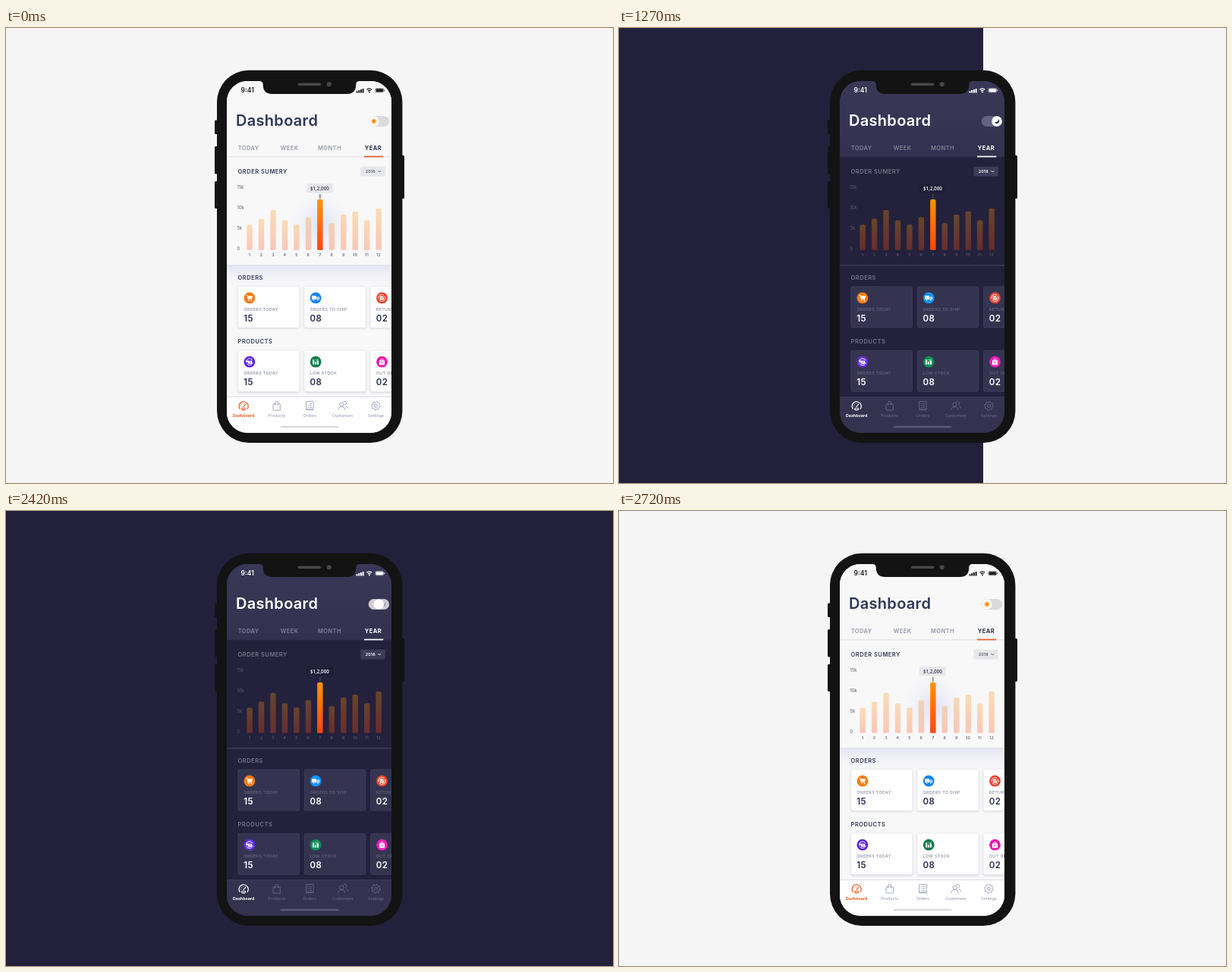
An HTML page with a canvas for the animation above (2790 ms loop, 800 by 600 pixels).

```html
<!DOCTYPE html>
<html lang="en">
<head>
<meta charset="utf-8">
<title>Dashboard theme switch</title>
<style>
html, body { margin: 0; width: 100%; height: 100%; overflow: hidden; background: #f5f5f5; }
canvas { display: block; width: 800px; height: 600px; }
</style>
</head>
<body>
<canvas id="stage" width="800" height="600"></canvas>
<script>
const ctx = document.getElementById('stage').getContext('2d');
const LOOP = 2790, STEP = 30;
const TAU = Math.PI * 2;

const light = {
  page: '#f5f5f5', head: ['#f8f8f9', '#f8f8f9'], body: '#f8f8f9', status: '#1c1c1e',
  title: '#2d3757', tab: '#9298a8', tabOn: '#2a3350', under: '#ec5a24', rule: '#dcdde0',
  section: '#2f3855', pick: '#e6e7ea', pickText: '#555c73', axis: '#565c70',
  tip: '#e8e8ec', tipText: '#333a50', pin: '#4a4a4a', barAlpha: 0.28,
  split: '#dfe1ea', card: '#ffffff', edge: '#ececf0', label: '#858ca0', number: '#263052',
  nav: '#ffffff', navRule: '#dfe0e5', navOn: '#ee5a1c', navOff: '#98a1b8', home: '#d9dade',
  icons: ['#f97a0b', '#1485f1', '#f03a25', '#5a22e4', '#087c48', '#ec18ae']
};
const dark = {
  page: '#22203b', head: ['#3a3857', '#33314f'], body: '#23213c', status: '#ffffff',
  title: '#ffffff', tab: '#828096', tabOn: '#ffffff', under: '#ffffff', rule: '#302e4a',
  section: '#777589', pick: '#3e3c58', pickText: '#ffffff', axis: '#5e5c73',
  tip: '#201e37', tipText: '#ffffff', pin: '#55536a', barAlpha: 0.31,
  split: '#3e3c57', card: '#353450', edge: '#424160', label: '#69677e', number: '#ffffff',
  nav: '#34324f', navRule: '#3b3957', navOn: '#ffffff', navOff: '#69677f', home: '#5c5a72',
  icons: ['#fb7d0c', '#1592f6', '#f4432c', '#6430ec', '#0a8f55', '#f31cb8']
};

function text(s, x, y, size, weight, color, spacing = 0, align = 'left', family = 'Inter') {
  ctx.font = `${weight} ${size}px ${family}, sans-serif`;
  ctx.letterSpacing = spacing + 'px';
  ctx.textAlign = align;
  ctx.fillStyle = color;
  ctx.fillText(s, x, y);
}

function box(x, y, w, h, r, color) {
  ctx.beginPath();
  ctx.roundRect(x, y, w, h, r);
  ctx.fillStyle = color;
  ctx.fill();
}

function disc(x, y, r, color) {
  ctx.beginPath();
  ctx.arc(x, y, r, 0, TAU);
  ctx.fillStyle = color;
  ctx.fill();
}

function line(points, color, width = 1) {
  ctx.beginPath();
  points.forEach(([x, y], i) => i ? ctx.lineTo(x, y) : ctx.moveTo(x, y));
  ctx.strokeStyle = color;
  ctx.lineWidth = width;
  ctx.stroke();
}

function arc(x, y, r, from, to, color, width = 1) {
  ctx.beginPath();
  ctx.arc(x, y, r, from, to);
  ctx.strokeStyle = color;
  ctx.lineWidth = width;
  ctx.stroke();
}

function outline(x, y, w, h, r, color, width = 0.9) {
  ctx.beginPath();
  ctx.roundRect(x, y, w, h, r);
  ctx.strokeStyle = color;
  ctx.lineWidth = width;
  ctx.stroke();
}

function at(x, y, draw) {
  ctx.save();
  ctx.translate(x, y);
  draw();
  ctx.restore();
}

function ramp(y0, y1, top, bottom) {
  const g = ctx.createLinearGradient(0, y0, 0, y1);
  g.addColorStop(0, top);
  g.addColorStop(1, bottom);
  return g;
}

// White glyphs inside the coloured card badges; c is the badge colour.
const badges = [
  () => {
    line([[-4.5, -3.5], [-3, -3.5], [-1.8, 1.8], [3.2, 1.8]], '#fff', 0.9);
    ctx.beginPath();
    ctx.moveTo(-2.9, -2.7); ctx.lineTo(4.3, -2.7); ctx.lineTo(3.3, 0.9); ctx.lineTo(-2, 0.9);
    ctx.fillStyle = '#fff';
    ctx.fill();
    disc(-1.2, 3.4, 0.9, '#fff');
    disc(2.6, 3.4, 0.9, '#fff');
  },
  c => {
    box(-5, -3, 5.8, 5.2, 0.6, '#fff');
    box(1.3, -1.4, 3.7, 3.6, 0.8, '#fff');
    box(2.5, -0.6, 1.6, 1.1, 0, c);
    for (const x of [-2.6, 2.6]) { disc(x, 2.5, 1.5, c); disc(x, 2.5, 1, '#fff'); }
  },
  c => {
    arc(0, 0, 4.6, -0.5, 2.5, '#fff', 1);
    arc(0, 0, 4.6, 2.9, 5.3, '#fff', 1);
    box(-2.7, -2.4, 5.4, 5, 0.8, '#fff');
    line([[-1.6, -0.8], [0, 0.9], [3.6, -3.2]], c, 0.9);
  },
  c => {
    arc(0, 0, 4.4, 3.3, 5.8, '#fff', 1);
    arc(0, 0, 4.4, 0.2, 2.6, '#fff', 1);
    box(-4.6, -1.8, 3.5, 2.5, 0.5, '#fff');
    box(-1.9, -1.4, 5.2, 4, 0.6, '#fff');
    box(0.1, -0.4, 1.3, 1.3, 0, c);
  },
  () => {
    box(-4, -3, 2, 6.5, 0, '#fff');
    box(-1.2, -0.3, 2, 3.8, 0, '#fff');
    box(1.7, -1.6, 2.1, 5.1, 0, '#fff');
    line([[-0.8, -3.2], [1, -1.8], [3.6, -3.8]], '#fff', 0.8);
  },
  c => {
    box(-3.6, -1.9, 7.2, 5.9, 0.6, '#fff');
    arc(0, -2, 1.8, Math.PI, TAU, '#fff', 0.9);
    line([[-1.2, -0.1], [1.2, 2.3]], c, 0.8);
    line([[1.2, -0.1], [-1.2, 2.3]], c, 0.8);
  }
];

const navIcons = [
  c => {
    arc(0, 0.5, 6, 2.45, 6.98, c, 1.2);
    line([[-0.4, 1.4], [2.8, -2]], c, 1.2);
    outline(-2.3, 3, 4.6, 2.4, 0.5, c, 1.1);
    for (let i = 0; i < 4; i++) {
      const a = Math.PI * (1.02 + i * 0.23);
      disc(Math.cos(a) * 3.8, 0.6 + Math.sin(a) * 3.8, 0.55, c);
    }
  },
  c => {
    outline(-4.7, -2.4, 9.4, 8.2, 0.6, c);
    line([[-2.2, -0.6], [-2.2, -3.6]], c, 0.9);
    line([[2.2, -0.6], [2.2, -3.6]], c, 0.9);
    arc(0, -3.6, 2.2, Math.PI, TAU, c, 0.9);
  },
  c => {
    outline(-4.8, -5.8, 9.6, 11.2, 0.5, c);
    for (const y of [-3, -0.4, 2.2]) {
      line([[-2.8, y], [-1.5, y]], c, 0.9);
      line([[-0.5, y], [2.8, y]], c, 0.9);
    }
    line([[-4.8, 4.2], [4.8, 4.2]], c, 0.7);
  },
  c => {
    arc(-1.5, -1.8, 2.6, 0, TAU, c, 0.9);
    arc(-1.5, 6, 4.9, Math.PI + 0.1, TAU - 0.1, c, 0.9);
    arc(2.5, -3.6, 2.4, -2.7, 1.6, c, 0.9);
    arc(2, 4.1, 4.6, -1.1, -0.1, c, 0.9);
  },
  c => {
    ctx.beginPath();
    for (let i = 0; i < 32; i++) {
      const a = (i + 0.5) / 32 * TAU, r = i % 4 < 2 ? 5.9 : 4.5;
      ctx.lineTo(Math.cos(a) * r, Math.sin(a) * r);
    }
    ctx.closePath();
    ctx.strokeStyle = c;
    ctx.lineWidth = 0.9;
    ctx.stroke();
    arc(0, 0, 2, 0, TAU, c, 0.9);
  }
];

function drawStatus(c) {
  text('9:41', 309.6, 85.2, 8.5, 600, c);
  for (let i = 0; i < 4; i++) box(461.5 + i * 2.7, 83.2 - i * 1.1, 2, 2.3 + i * 1.1, 0.5, c);
  for (const r of [2.6, 5]) arc(478.8, 85, r, -2.32, -0.82, c, 1.3);
  disc(478.8, 84.6, 0.9, c);
  outline(486.9, 79.6, 10.7, 5.2, 1.4, c, 0.5);
  box(487.6, 80.2, 9.3, 4, 0.8, c);
  box(498.2, 81.2, 0.9, 2, 0.4, c);
}

function drawHeader(p) {
  ctx.fillStyle = ramp(70, 170, ...p.head);
  ctx.fillRect(291, 70, 217, 100);
  ctx.fillStyle = p.rule;
  ctx.fillRect(291, 169.4, 217, 1);
  drawStatus(p.status);
  text('Dashboard', 303, 128.8, 20, 600, p.title, 0.3);
  [['TODAY', 305.7], ['WEEK', 361.8], ['MONTH', 411], ['YEAR', 472.8]].forEach(([s, x], i) =>
    text(s, x, 161.3, 7.5, i === 3 ? 700 : 600, i === 3 ? p.tabOn : p.tab, 0.4));
  ctx.fillStyle = p.under;
  ctx.fillRect(472, 168.7, 25.3, 1.7);
}

function drawChart(p) {
  text('ORDER SUMERY', 305.6, 191.6, 7.5, 600, p.section, 0.5);
  box(467.3, 182.8, 32.4, 12.6, 1.5, p.pick);
  text('2018', 473.8, 191, 5.3, 600, p.pickText, 0.1);
  line([[490.3, 188], [492.3, 190], [494.3, 188]], p.pickText, 0.9);

  if (p === light) {
    const glow = ctx.createRadialGradient(414, 258, 4, 414, 258, 40);
    glow.addColorStop(0, 'rgba(205,205,240,.5)');
    glow.addColorStop(1, 'rgba(225,225,245,0)');
    ctx.fillStyle = glow;
    ctx.fillRect(372, 216, 84, 84);
  }
  ['15k', '10k', '5k', '0'].forEach((s, i) => text(s, 304.6, 212 + i * 26.9, 5.6, 400, p.axis));

  const tops = [259.5, 251.5, 240, 253.5, 259.3, 249.5, 226, 257.3, 246, 242, 253.5, 238];
  tops.forEach((y, i) => {
    const x = 321.1 + i * 15.46;
    ctx.globalAlpha = i === 6 ? 1 : p.barAlpha;
    box(x - 3.7, y, 7.4, 292.7 - y, [2, 2, 0.8, 0.8], ramp(y, 292.7, '#ff9408', '#ff4610'));
    ctx.globalAlpha = 1;
    text(String(i + 1), x - 0.2, 301, 5.3, i === 6 ? 600 : 500, p.axis, 0, 'center');
  });
  box(396, 205.2, 35, 12.4, 1.8, p.tip);
  text('$1,2,000', 413.4, 213.6, 6.3, 600, p.tipText, 0, 'center', '"Open Sans"');
  line([[413.9, 218.8], [413.9, 225.4]], p.pin, 1);
}

function drawCards(p) {
  if (p === light) {
    ctx.fillStyle = ramp(313, 342, 'rgba(222,222,242,.75)', 'rgba(240,240,250,0)');
    ctx.fillRect(291, 313, 217, 29);
  }
  ctx.fillStyle = p.split;
  ctx.fillRect(291, 312.2, 217, 1.5);

  const rows = [
    ['ORDERS', [['ORDERS TODAY', '15'], ['ORDERS TO SHIP', '08'], ['RETURNS', '02']]],
    ['PRODUCTS', [['ORDERS TODAY', '15'], ['LOW STOCK', '08'], ['OUT OF STOCK', '02']]]
  ];
  rows.forEach(([name, cards], r) => at(0, r * 84.3, () => {
    text(name, 305.6, 332, 7.5, 600, p.section, 0.5);
    cards.forEach(([label, count], i) => at(i * 87.3, 0, () => {
      ctx.save();
      if (p === light) {
        ctx.shadowColor = 'rgba(40,40,70,.24)';
        ctx.shadowBlur = 3;
        ctx.shadowOffsetY = 0.8;
      }
      box(305.6, 340.8, 81.3, 54.5, 2, p.card);
      ctx.restore();
      outline(305.9, 341.1, 80.7, 53.9, 2, p.edge, 0.6);
      const k = r * 3 + i;
      disc(320.9, 355.9, 7.4, p.icons[k]);
      at(320.9, 355.9, () => badges[k](p.icons[k]));
      text(label, 313.2, 372.7, 5.4, 500, p.label, 0.35);
      text(count, 313.2, 387, 11.5, 600, p.number, 0.4);
    }));
  }));
}

function drawNav(p) {
  ctx.save();
  if (p === light) {
    ctx.shadowColor = 'rgba(40,40,70,.2)';
    ctx.shadowBlur = 3;
  }
  ctx.fillStyle = p.nav;
  ctx.fillRect(291, 486.5, 217, 48);
  ctx.restore();
  ctx.fillStyle = p.navRule;
  ctx.fillRect(291, 486, 217, 1);
  ['Dashboard', 'Products', 'Orders', 'Customers', 'Settings'].forEach((s, i) => {
    const x = 313.1 + i * 43.6, c = i ? p.navOff : p.navOn;
    at(x, 498.2, () => navIcons[i](c));
    text(s, x, 513.4, 5.3, i ? 500 : 700, c, 0, 'center');
  });
  box(361.5, 524.7, 77, 2.5, 1.25, p.home);
}

function drawSun(x) {
  disc(x, 123, 4.2, '#fdebcf');
  for (let i = 0; i < 8; i++) {
    const a = i / 8 * TAU;
    line([[x + Math.cos(a) * 2.6, 123 + Math.sin(a) * 2.6],
          [x + Math.cos(a) * 4, 123 + Math.sin(a) * 4]], '#fbb65c', 0.8);
  }
  disc(x, 123, 2.4, '#f98a12');
}

function drawMoon(x) {
  ctx.beginPath();
  ctx.arc(x - 0.2, 122.8, 3.3, -0.85, 2.6);
  ctx.quadraticCurveTo(x + 2.2, 124.2, x + 2, 120.3);
  ctx.fillStyle = '#38365a';
  ctx.fill();
}

// State: 0 day, 1 night, 0.5 a blend of both knobs.
function drawToggle(state, pill) {
  box(477.6, 115.9, 27.6, 14.2, 7.1, pill);
  if (state === 0) {
    disc(484.9, 123, 6.7, '#fbfbfb');
    drawSun(484.9);
  } else if (state === 1) {
    disc(498, 123, 6.8, '#ffffff');
    drawMoon(498);
  } else {
    ctx.globalAlpha = 0.3;
    disc(485, 123, 6.7, '#fff');
    disc(498, 123, 6.7, '#fff');
    drawSun(485.5);
    drawMoon(497.5);
    ctx.globalAlpha = 1;
    disc(491.3, 123, 6.8, '#fdfdfd');
  }
}

function drawPhone(p, state, pill) {
  const shell = '#131313';
  box(275, 121.5, 6, 18.5, 1.5, shell);
  box(275, 156, 6, 36.5, 1.5, shell);
  box(275, 202, 6, 36, 1.5, shell);
  box(519, 168, 6, 57, 1.5, shell);
  box(278, 55.8, 244.4, 491.2, 42, shell);

  ctx.save();
  ctx.beginPath();
  ctx.roundRect(291, 70, 217, 463.7, 27);
  ctx.clip();
  ctx.fillStyle = p.body;
  ctx.fillRect(291, 70, 217, 464);
  drawHeader(p);
  drawChart(p);
  drawCards(p);
  drawNav(p);
  drawToggle(state, pill);
  ctx.restore();

  ctx.beginPath();
  ctx.moveTo(334, 69);
  ctx.lineTo(334, 70);
  ctx.quadraticCurveTo(338.7, 70, 338.7, 74.5);
  ctx.quadraticCurveTo(338.7, 87, 351, 87);
  ctx.lineTo(449, 87);
  ctx.quadraticCurveTo(461.3, 87, 461.3, 74.5);
  ctx.quadraticCurveTo(461.3, 70, 466, 70);
  ctx.lineTo(466, 69);
  ctx.fillStyle = shell;
  ctx.fill();
  box(384.7, 72.4, 30.6, 3.6, 1.8, '#484848');
  disc(425.7, 74.2, 3, '#484848');
}

function draw(t) {
  const steps = from => Math.floor((t - from) / STEP);
  const clamp = v => Math.max(0, Math.min(1, v));

  const edge = t < 2420 ? 800 * clamp(steps(1090) / 10) : 800 * (1 - clamp(steps(2420) / 9));
  const palette = t >= 1090 && t < 2720 ? dark : light;

  let state = t >= 1060 && t < 2420 ? 1 : 0;
  let pill = state ? '#65637f' : t >= 2450 && t < 2720 ? '#e0e0e2' : '#dadadb';
  if (t >= 1030 && t < 1060) { state = 0.5; pill = '#8e8da1'; }
  if (t >= 2420 && t < 2450) { state = 0.5; pill = '#b5b4bf'; }

  ctx.fillStyle = light.page;
  ctx.fillRect(0, 0, 800, 600);
  ctx.fillStyle = dark.page;
  ctx.fillRect(0, 0, edge, 600);
  drawPhone(palette, state, pill);
}

function tick() {
  draw(performance.now() % LOOP);
  requestAnimationFrame(tick);
}
tick();
</script>
</body>
</html>
```
